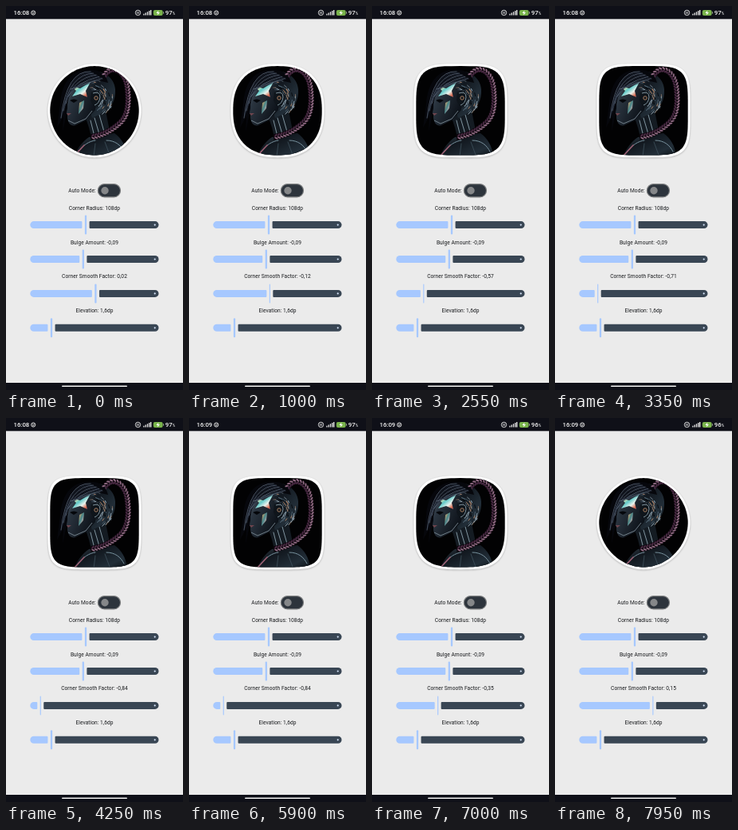
Recreate the animation shown at these times as an HTML page. Size 222x480 px, loop 8000 ms.

```html
<!DOCTYPE html>
<html lang="en">
<head>
<meta charset="utf-8">
<title>Shape controls</title>
<style>
html, body { margin: 0; width: 100%; height: 100%; overflow: hidden; background: #ebebeb; }
svg { display: block; width: 222px; height: 480px; }
text { font-family: Roboto, "Noto Sans", sans-serif; }
.label { font-size: 6.6px; letter-spacing: .06px; fill: #17191c; text-anchor: middle; }
.status text { fill: #f2f2f2; font-weight: 500; }
</style>
</head>
<body>
<svg viewBox="0 0 222 480">
  <defs>
    <clipPath id="clip"><path id="inner"/></clipPath>
    <linearGradient id="holo" x1="0" y1="0" x2="1" y2="1">
      <stop offset="0" stop-color="#c98a3c"/>
      <stop offset=".25" stop-color="#f4e3a4"/>
      <stop offset=".45" stop-color="#62c9c8"/>
      <stop offset=".65" stop-color="#e9f3ee"/>
      <stop offset=".82" stop-color="#d7694f"/>
      <stop offset="1" stop-color="#4c4a80"/>
    </linearGradient>
    <linearGradient id="skin" x1="0" y1="0" x2="1" y2=".6">
      <stop offset="0" stop-color="#6a7a86"/>
      <stop offset=".35" stop-color="#2a343f"/>
      <stop offset="1" stop-color="#0d1219"/>
    </linearGradient>
    <linearGradient id="metal" x1="0" y1="0" x2="1" y2="1">
      <stop offset="0" stop-color="#3b4a55"/>
      <stop offset=".35" stop-color="#12181f"/>
      <stop offset=".7" stop-color="#222e38"/>
      <stop offset="1" stop-color="#05070a"/>
    </linearGradient>
    <filter id="soft" x="-10%" y="-10%" width="120%" height="120%"><feGaussianBlur stdDeviation="1.1"/></filter>
  </defs>

  <rect width="222" height="480" fill="#ebebeb"/>

  <path id="shadow" transform="translate(0 .8)" fill="#000" opacity=".24" filter="url(#soft)"/>
  <path id="outer" fill="#fff"/>
  <g clip-path="url(#clip)">
    <rect x="50" y="70" width="122" height="122" fill="#020203"/>
    <!-- shoulders and neck -->
    <path d="M84 192C88 180 94 171 104 164L136 159C146 166 151 176 153 192Z" fill="url(#metal)"/>
    <path d="M100 140L124 126L130 156L108 168L104 152Z" fill="#141b22"/>
    <g fill="none" stroke-linecap="round">
      <path d="M106 143L111 163M111 140L117 160M117 136L123 157" stroke="#8195a0" stroke-width="1"/>
      <path d="M90 182C97 174 104 169 112 168M126 168C137 168 144 174 148 182" stroke="#77909c" stroke-width="1"/>
      <path d="M86 187L98 174" stroke="#9b5f72" stroke-width="1.6"/>
      <path d="M112 172L110 188M124 170L130 186" stroke="#3f515c" stroke-width=".8"/>
    </g>
    <!-- skull -->
    <path d="M98 84C118 76 136 88 137 104C138 118 132 127 124 132L108 140L99 112Z" fill="url(#metal)"/>
    <!-- face in profile -->
    <path d="M83 98C78 104 77 112 77 118L73 127L76 130L75 133L77 136L77 140C78 147 82 151 87 149L100 143L112 130L112 105L98 94Z" fill="url(#skin)"/>
    <path d="M80 118Q85 115 90 118L85 121Z" fill="#05070b"/>
    <path d="M76 134L82 134L78 137Z" fill="#71464e"/>
    <path d="M78 143L86 147L100 141L108 131" fill="none" stroke="#8696a0" stroke-width=".8"/>
    <g id="flecks" fill="none" stroke-linecap="round"></g>
    <path d="M82 100L93 103L106 95L100 106L102 114L93 110L83 113L88 106Z" fill="url(#holo)"/>
    <path d="M92 121L98 118L97 128L91 135Z" fill="url(#holo)" opacity=".6"/>
    <!-- ear unit -->
    <path d="M107 108L116 106L121 113L117 124L110 126L106 118Z" fill="#0f151b"/>
    <g fill="none" stroke="#8ea3ae" stroke-width=".9">
      <path d="M109 109Q118 106 118 114Q117 122 111 124"/>
      <circle cx="113" cy="115" r="2.2" stroke="#b98b69"/>
    </g>
    <!-- hair -->
    <path d="M108 80C84 78 70 94 68 122L64 152L72 138L71 158L77 128C77 114 82 104 94 97L110 92L128 96C126 86 118 80 108 80Z" fill="#06070c"/>
    <g id="hair" fill="none" stroke-linecap="round"></g>
    <path id="braidLine" d="M124 86C134 72 149 82 152 100C155 122 153 138 142 147C132 156 120 162 106 164" fill="none" stroke="#0d070d" stroke-width="7.4"/>
    <g id="braid"></g>
  </g>

  <text class="label" x="95.5" y="233">Auto Mode:</text>
  <rect x="115.3" y="222.6" width="28.2" height="16.2" rx="8.1" fill="#2d343c" stroke="#7d7f80" stroke-width="1.2"/>
  <circle cx="124" cy="230.7" r="4.7" fill="#858789"/>
  <g id="sliders"></g>

  <g class="status">
    <rect width="222" height="16.3" fill="#0f1018"/>
    <text id="clock" x="9.5" y="11.2" font-size="7.8"></text>
    <circle cx="34.2" cy="8.5" r="2.6" fill="none" stroke="#ddd" stroke-width="1"/>
    <path d="M32.4 8H36M33.2 9.6H35.2" stroke="#ddd" stroke-width=".8"/>
    <circle cx="165.5" cy="8.4" r="3.2" fill="none" stroke="#eee" stroke-width=".9"/>
    <path d="M164.6 6.9V9.9M166.4 6.9V9.9" stroke="#eee" stroke-width=".8"/>
    <path d="M172.9 9.7V11.5M175.2 8.5V11.5M177.5 7.2V11.5M179.8 6V11.5M181.7 5V11.5" stroke="#eee" stroke-width="1.3"/>
    <rect x="184.8" y="5" width="11.8" height="7" rx="2" fill="#79b34b"/>
    <path d="M197.6 7.2V9.7" stroke="#999" stroke-width="1"/>
    <path d="M191.5 5.5L188.3 9H190.4L189.7 11.4L193 7.9H190.9Z" fill="#fff"/>
    <text x="199.8" y="11.2" font-size="7.8"><tspan id="charge"></tspan><tspan font-size="4.6">%</tspan></text>
  </g>
  <rect y="471" width="222" height="9" fill="#0f1018"/>
  <path d="M70.8 475.3H151.2" stroke="#f4f4f4" stroke-width="1.6" stroke-linecap="round"/>
</svg>
<script>
const LOOP = 8000, STEP = 50;
const $ = id => document.getElementById(id);

// Time in ms, smooth factor
const drag = [
  [0, .02], [500, .02], [1300, -.2], [1900, -.36], [2150, -.46], [2650, -.6],
  [3050, -.6], [3350, -.71], [3600, -.83], [3750, -.83], [4000, -.92], [4250, -.84],
  [5900, -.84], [6300, -.69], [6700, -.48], [7000, -.35], [7550, -.05], [7950, .15], [8000, .15]
];

function add(parent, tag, attrs) {
  const el = document.createElementNS("http://www.w3.org/2000/svg", tag);
  for (const key in attrs) el.setAttribute(key, attrs[key]);
  return parent.appendChild(el);
}

function valueAt(t) {
  const i = Math.max(1, drag.findIndex(p => p[0] > t));
  const [t0, a] = drag[i - 1], [t1, b] = drag[i];
  return a + (b - a) * (t - t0) / (t1 - t0);
}

// Superellipse outline around the portrait's centre
function outline(radius, power) {
  const axis = c => Math.sign(c) * radius * Math.abs(c) ** (2 / power);
  let d = "";
  for (let i = 0; i < 144; i++) {
    const a = i * Math.PI / 72;
    d += (i ? "L" : "M") + (111 + axis(Math.cos(a))).toFixed(2) + " " + (130.8 + axis(Math.sin(a))).toFixed(2);
  }
  return d + "Z";
}

function bar(x0, x1, y, left, right) {
  const top = y - 4.5, end = y + 4.5;
  const arc = (r, x, y) => `A${r} ${r} 0 0 1 ${x} ${y}`;
  return `M${x0 + left} ${top}H${x1 - right}${arc(right, x1, top + right)}V${end - right}` +
    `${arc(right, x1 - right, end)}H${x0 + left}${arc(left, x0, end - left)}V${top + left}${arc(left, x0 + left, top)}Z`;
}

function slider(y, text) {
  const g = $("sliders");
  const label = add(g, "text", { class: "label", x: 111, y: y - 19 });
  label.textContent = text;
  const rest = add(g, "path", { fill: "#394654" });
  const active = add(g, "path", { fill: "#a6c8ff" });
  const thumb = add(g, "rect", { y: y - 12, height: 24, rx: 1, fill: "#a6c8ff" });
  add(g, "circle", { cx: 186.7, cy: y, r: 1.1, fill: "#d5e3f8" });
  return {
    label,
    move(x, width) {
      const gap = 3.4 + width / 2;
      active.setAttribute("d", bar(30.3, x - gap, y, 4.5, 1));
      rest.setAttribute("d", bar(x + gap, 191.5, y, 1, 4.5));
      thumb.setAttribute("x", x - width / 2);
      thumb.setAttribute("width", width);
    }
  };
}

slider(273.6, "Corner Radius: 108dp").move(100, 2.3);
slider(316.5, "Bulge Amount: -0,09").move(96.8, 2.3);
const smooth = slider(359.4, "");
slider(402.3, "Elevation: 1,6dp").move(57, 2.3);

// Small glints over the head, lying along its curve
let seed = 7;
const random = () => (seed = seed * 16807 % 2147483647) / 2147483647;
const glints = ["#a9bcc8", "#4b5f6d", "#05070a", "#7d92a0", "#b08a70"];
for (let i = 0; i < 80; i++) {
  const a = random() * 2.6 - 1.7, r = .3 + random() * .65;
  const x = 107 + 29 * r * Math.cos(a), y = 114 + 31 * r * Math.sin(a), len = 2 + random() * 3;
  add($("flecks"), "path", {
    d: `M${x} ${y}l${-Math.sin(a) * len} ${Math.cos(a) * len}`,
    stroke: glints[i % 5], "stroke-width": .5 + random() * .7
  });
}

for (let i = 0; i < 14; i++) {
  add($("hair"), "path", {
    d: `M${106 + i * 1.2} ${82 + i * .7}Q${76 + i * 1.3} ${80 + i * 1.7} ${69 + i} ${140 - i * 3}`,
    stroke: i % 3 ? "#232b3a" : "#77879a", "stroke-width": .6
  });
}

const braidLine = $("braidLine"), length = braidLine.getTotalLength();
for (let s = 0; s < length; s += 3.6) {
  const p = braidLine.getPointAtLength(s), q = braidLine.getPointAtLength(s + .5);
  const turn = Math.atan2(q.y - p.y, q.x - p.x) * 180 / Math.PI;
  for (const side of [-1, 1]) {
    add($("braid"), "ellipse", {
      cy: side * 1.7, rx: 2.4, ry: 1, fill: side < 0 ? "#8f6a82" : "#4a2b44",
      transform: `translate(${p.x} ${p.y}) rotate(${turn}) rotate(${-side * 38} 0 ${side * 1.7})`
    });
  }
}

function draw(t) {
  const v = valueAt(t), power = 2 - (v < 0 ? 3.4 : .4) * v;
  const edge = outline(58.6, power);
  $("outer").setAttribute("d", edge);
  $("shadow").setAttribute("d", edge);
  $("inner").setAttribute("d", outline(55.7, power));
  smooth.move(110.8 + 80.4 * v, t < 500 ? 2.3 : 1.15);
  smooth.label.textContent = "Corner Smooth Factor: " + v.toFixed(2).replace(".", ",");
  $("clock").textContent = t < 5900 ? "16:08" : "16:09";
  $("charge").textContent = t < 6750 ? "97" : "96";
}

const start = performance.now();
function tick() {
  const t = (performance.now() - start) % LOOP;
  draw(Math.floor(t / STEP) * STEP);
  requestAnimationFrame(tick);
}
tick();
</script>
</body>
</html>
```
